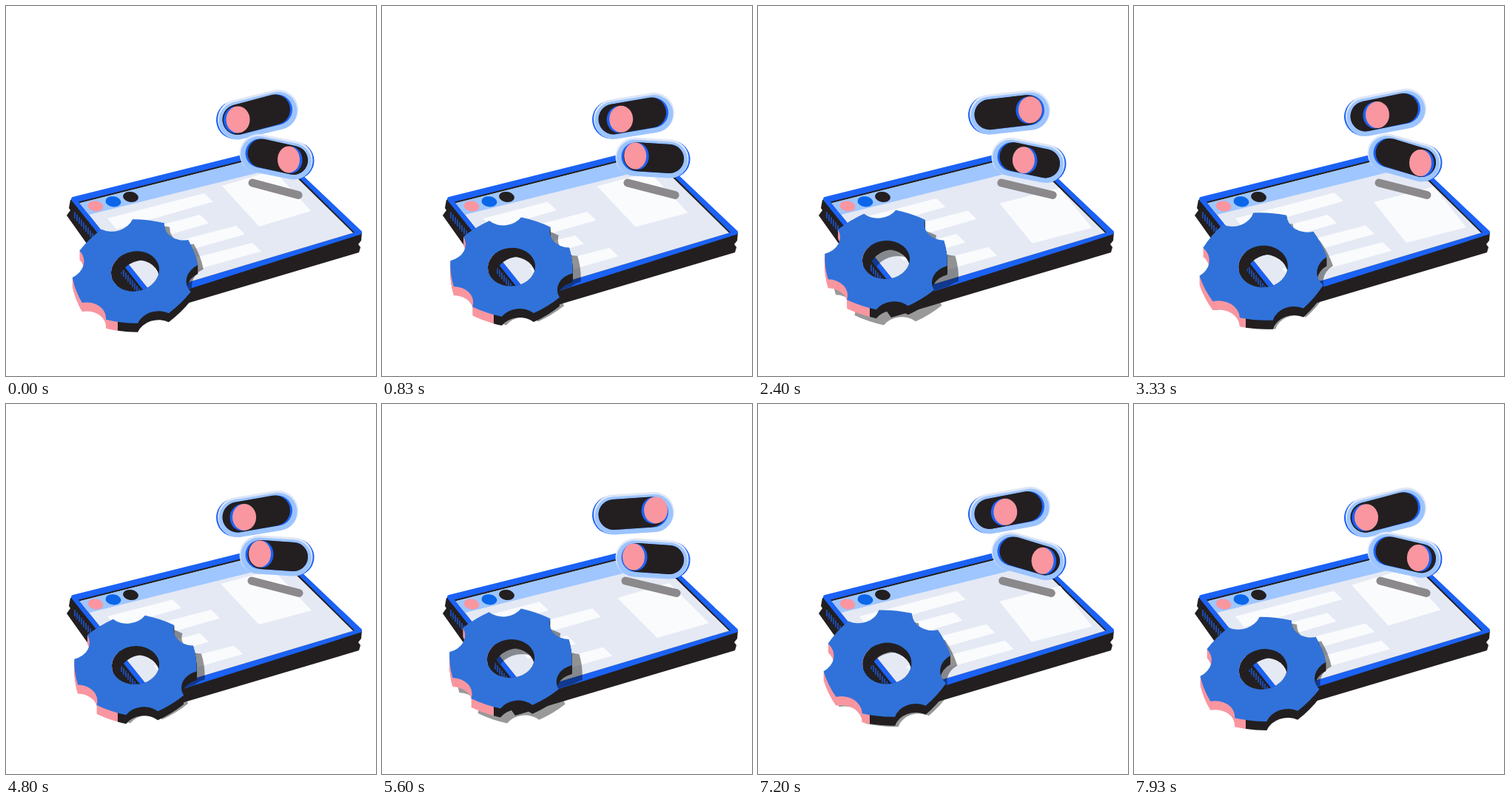
An HTML page that plays this animation: 500x500 px, repeating every 8.01 s.

```html
<!DOCTYPE html>
<html lang="en">
<head>
<meta charset="utf-8">
<title>Settings window</title>
<style>
html, body { margin: 0; width: 100%; height: 100%; overflow: hidden; background: #fff; }
svg { display: block; width: 100vw; height: 100vh; }
#toggles line { stroke-linecap: round; }
.round { stroke-width: 6; stroke-linejoin: round; }
</style>
</head>
<body>
<svg viewBox="0 0 500 500">
  <defs>
    <g id="depth"></g>
    <clipPath id="screen"><path d="M98 264.500 362 198 471 306 197 388Z"/></clipPath>
    <clipPath id="deck"><path d="M87 262 360 190 481 306 198 398Z"/></clipPath>
    <clipPath id="lit"><rect width="151" height="500"/></clipPath>
    <clipPath id="unlit"><rect x="151" width="349" height="500"/></clipPath>
    <clipPath id="bore"><circle r=".405"/></clipPath>
  </defs>

  <path id="groundShadow" fill="#000" fill-opacity=".4" fill-rule="evenodd"/>

  <g id="window">
    <path fill="#231f20" d="M87 262 85 273 87 276 82 283 180 421 477 333 479 326 476 322 480 317 481 306Z"/>
    <path id="vents" stroke="#1b62f5" stroke-width="1.300"/>
    <path class="round" fill="#1b62f5" stroke="#1b62f5" d="M91 261 360 194 478 306 198 395Z"/>
    <g clip-path="url(#screen)">
      <path fill="#231f20" d="M90 260 362 190 480 306 197 395Z"/>
      <path fill="#e4e9f4" d="M97 267 361 200.500 470.500 308 197 390Z"/>
      <path fill="#9fc6ff" d="M97 267 112 282 386 214 361 200.500Z"/>
      <g id="bars" fill="#fafbfd"></g>
      <path id="panel" fill="#fafbfd"/>
    </g>
    <g id="dots"></g>
  </g>

  <g clip-path="url(#deck)">
    <path id="gearShadow" fill="#000" fill-opacity=".42" fill-rule="evenodd"/>
    <line id="pillShadow" stroke="#8b898b" stroke-width="11" stroke-linecap="round"/>
  </g>

  <g clip-path="url(#lit)"><use href="#depth" fill="#f996a0"/></g>
  <g clip-path="url(#unlit)"><use href="#depth" fill="#231f20"/></g>
  <g id="gear">
    <g clip-path="url(#bore)"><path id="wall" fill="#231f20" fill-rule="evenodd"/></g>
    <path id="face" fill="#3072da" fill-rule="evenodd"/>
  </g>
  <g id="toggles"></g>
</svg>
<script>
const $ = id => document.getElementById(id);
const set = (el, attrs) => {
  for (const k in attrs) el.setAttribute(k, attrs[k]);
  return el;
};
const add = (parent, tag, attrs = {}) =>
  parent.appendChild(set(document.createElementNS('http://www.w3.org/2000/svg', tag), attrs));

const LOOP = 8010, CYCLE = 4000;
const KEYS = [0, 800, 1600, 2530, 3330];

// Smooth periodic curve through one value per key time.
function track(...v) {
  const n = KEYS.length;
  const time = i => KEYS[(i + n) % n] + Math.floor(i / n) * CYCLE;
  const value = i => v[(i + n) % n];
  const slope = i => (value(i + 1) - value(i - 1)) / (time(i + 1) - time(i - 1));
  return t => {
    let i = n - 1;
    while (KEYS[i] > t) i--;
    const h = time(i + 1) - time(i), s = (t - time(i)) / h, s2 = s * s, s3 = s2 * s;
    return value(i) * (2 * s3 - 3 * s2 + 1) + value(i + 1) * (3 * s2 - 2 * s3)
      + h * (slope(i) * (s3 - 2 * s2 + s) + slope(i + 1) * (s3 - s2));
  };
}

// Gear outline in unit space: six teeth with scalloped gaps, one tooth on the x axis.
const polar = (r, deg) => {
  const a = deg * Math.PI / 180;
  return `${(r * Math.cos(a)).toFixed(4)} ${(r * Math.sin(a)).toFixed(4)}`;
};
const circle = (x, y, r) =>
  `M${x - r} ${y}a${r} ${r} 0 1 0 ${2 * r} 0a${r} ${r} 0 1 0 ${-2 * r} 0Z`;
let rim = 'M' + polar(1.055, 15);
for (let a = 0; a < 360; a += 60)
  rim += `A.35 .35 0 0 0 ${polar(1.055, a + 45)}A2 2 0 0 1 ${polar(1.055, a + 75)}`;
rim += 'Z';
const HOLE = circle(0, 0, .405);
for (const id of ['groundShadow', 'gearShadow', 'face']) set($(id), { d: rim + HOLE });
const DEPTH = 12;
const slices = [];
for (let i = DEPTH; i > 0; i--)
  slices.push(add($('depth'), 'path', { d: rim + HOLE, 'fill-rule': 'evenodd' }));

// The axes are the screen vectors of the gear's two unit directions.
const gear = {
  x: track(174.5, 175, 174, 173, 174.5),
  y: track(358.5, 353, 344, 343.5, 352),
  axes: [
    track(17.6, 32, 33, 31, 9), track(-66.5, -59.5, -59.5, -60, -69.6),
    track(78.5, 72.5, 72.3, 73, 82), track(9.5, 24, 24.7, 23, 6.2)
  ],
  shadowX: track(182, 186, 188, 188, 183)
};
const SHADOW_Y = 364;

function drawGear(t) {
  const x = gear.x(t), y = gear.y(t), axes = gear.axes.map(f => f(t));
  const [a, b, c, d] = axes, det = a * d - b * c;
  const place = (el, px, py) => set(el, { transform: `matrix(${axes} ${px} ${py})` });
  slices.forEach((el, i) => place(el, x, y + DEPTH - i));
  place($('gear'), x, y);
  const ox = 10, oy = DEPTH;
  const back = circle((ox * d - oy * c) / det, (oy * a - ox * b) / det, .405);
  set($('wall'), { d: HOLE + back });
  place($('gearShadow'), gear.shadowX(t), SHADOW_Y);
  place($('groundShadow'), gear.shadowX(t) - 5, SHADOW_Y);
}

// Window contents.
let vents = '';
for (let x = 93; x < 190; x += 3) vents += `M${x} ${268 + 1.19 * (x - 87) + 3}v9`;
set($('vents'), { d: vents });
[[121, 270.5, '#f996a0'], [145, 264.3, '#0b66ea'], [168.5, 258, '#231f20']].forEach(([cx, cy, fill]) =>
  add($('dots'), 'ellipse', { cx, cy, rx: 10.5, ry: 7, fill, transform: `rotate(8 ${cx} ${cy})` }));

// Each bar: left edge, a point on its top line, and the moving right end.
const bars = [
  { left: 137, x0: 268, y0: 253, end: track(268, 225, 213, 246, 271) },
  { left: 170, x0: 262, y0: 282, end: track(262, 277, 284, 282, 262) },
  { left: 185, x0: 311, y0: 297, end: track(311, 262, 250, 273, 313) },
  { left: 200, x0: 333, y0: 320, end: track(333, 308, 299, 314, 336) }
].map(bar => ({ ...bar, el: add($('bars'), 'path') }));

const panel = [
  [track(292, 290, 318, 327, 324), track(243, 243, 262, 267, 265)],
  [track(342, 342, 372, 370, 368), track(298, 298, 316, 321, 320)],
  [track(412, 413, 442, 452, 449), track(277, 279, 296, 300, 299)]
];
const pillLeft = track(333, 332, 329, 329, 331);
const pillRight = track(395, 396, 398, 398, 396);

function drawWindow(t) {
  for (const { left, x0, y0, end, el } of bars) {
    const x = end(t), top = px => y0 - .26 * (px - x0);
    set(el, { d: `M${left} ${top(left)}L${x} ${top(x)}l12 11.5L${left + 12} ${top(left) + 14.5}Z` });
  }
  const [a, b, c] = panel.map(p => p.map(f => f(t)));
  set($('panel'), { d: `M${a}L${b}L${c}L${a[0] + c[0] - b[0]} ${a[1] + c[1] - b[1]}Z` });
  set($('pillShadow'), { x1: pillLeft(t), y1: 239, x2: pillRight(t), y2: 255.5 });
}

// Switches: stacked capsules [colour, width, near shift, far shift, dy] plus a knob.
// The near end is the one that shows the outer wall; side tells where it points.
function makeToggle({ side, left, right, r, ...motion }) {
  const layers = [
    ['#1b62f5', 2 * r - 2, 3, 0, .5],
    ['#dfe7f7', 2 * r, 0, 0, 0],
    ['#9cc4ff', 2 * r - 3, 0, 0, 1.5],
    ['#1b62f5', 2 * r - 13, 0, 1.5, 0],
    ['#231f20', 2 * r - 13, 0, 4.5, 0]
  ].map(([stroke, width, near, far, dy]) => {
    const [dl, dr] = side < 0 ? [-near, -far + 1.5] : [far - 1.5, near];
    return { dl, dr, dy, el: add($('toggles'), 'line', { stroke, 'stroke-width': width }) };
  });
  const knob = fill => add($('toggles'), 'ellipse', { rx: side < 0 ? 16 : 15, ry: 18, fill });
  const edge = knob('#1b62f5'), cap = knob('#f996a0');
  return t => {
    const yl = motion.yl(t), yr = motion.yr(t), cx = motion.kx(t), cy = motion.ky(t);
    for (const { dl, dr, dy, el } of layers)
      set(el, { x1: left + dl, y1: yl + dy, x2: right + dr, y2: yr + dy });
    set(edge, { cx: cx + 3.5 * side, cy: cy + .5 });
    set(cap, { cx, cy });
  };
}
const toggles = [
  makeToggle({
    side: -1, left: 313, right: 366.5, r: 27,
    yl: track(153.5, 153, 149.5, 146.5, 149),
    yr: track(140, 144, 146, 140, 138.5),
    kx: track(313.5, 322, 370, 365, 329),
    ky: track(153.5, 153, 143.5, 140.5, 147)
  }),
  makeToggle({
    side: 1, left: 343, right: 388.5, r: 26,
    yl: track(199, 203.5, 207.5, 203, 198.5),
    yr: track(208.5, 206.5, 210.5, 213, 211.5),
    kx: track(382, 343, 340, 362.5, 387),
    ky: track(207.5, 202.5, 206.5, 208.5, 212)
  })
];

const start = performance.now();
function frame() {
  const t = (performance.now() - start) % LOOP % CYCLE;
  drawWindow(t);
  drawGear(t);
  toggles.forEach(draw => draw(t));
  requestAnimationFrame(frame);
}
frame();
</script>
</body>
</html>
```
